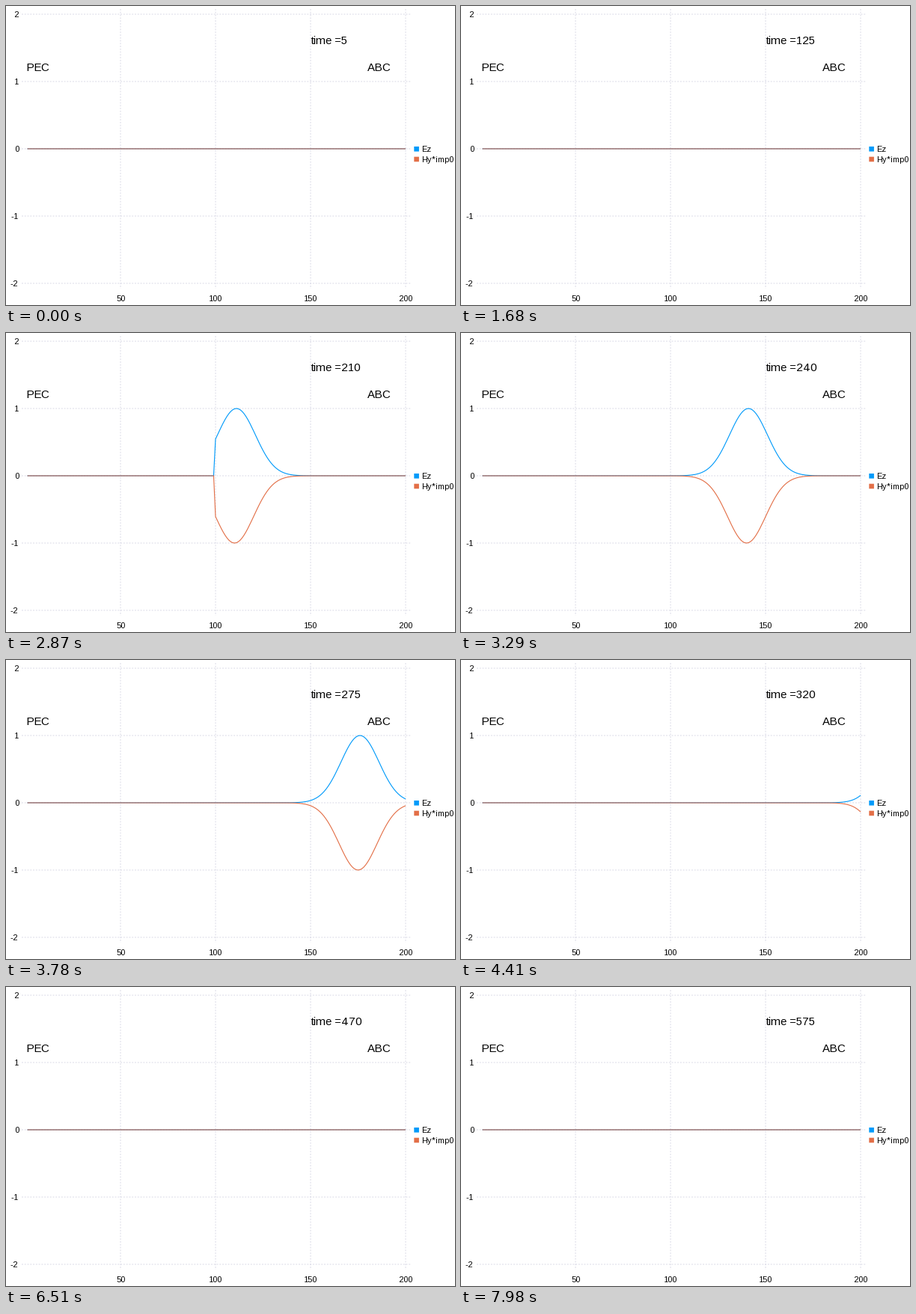
These frames come from a looping animation (600 by 400 pixels, 8 s). A matplotlib script:

```python
import numpy as np
import matplotlib.pyplot as plt
from matplotlib.animation import FuncAnimation
from matplotlib.patches import Rectangle

W, H, DPI = 600, 400, 100
PX = 72 / DPI                       # points per pixel
TICK, INTERVAL, LOOP = 70, 20, 8000
SOURCE, SIGMA, DELAY = 100, 10, 200
BLUE, ORANGE = "#009afa", "#e36f47"

# a hinting factor of 1 rounds glyph advances to whole pixels
plt.rcParams.update({"font.family": "Liberation Sans",
                     "text.hinting": "force_autohint",
                     "text.hinting_factor": 1})

fig = plt.figure(figsize=(W / DPI, H / DPI), dpi=DPI, facecolor="white")
ax = fig.add_axes([0, 0, 1, 1])
ax.set(xlim=(0, W), ylim=(H, 0))
ax.axis("off")


def sx(cell):
    return 26 + 2.54 * cell


def sy(value):
    return 191 - 90 * value


def label(x, y, text, size=10.67, ha="left"):
    return ax.text(x, y, text, fontsize=size * PX, ha=ha, va="baseline",
                   color="black", zorder=5)


def grid_line(xs, ys):
    ax.plot(xs, ys, color="#d0d0e0", lw=0.8 * PX, zorder=1, snap=False,
            dashes=(2.36, 2.36), dash_capstyle="butt")


def curve(color, z):
    line, = ax.plot([], [], color=color, lw=1.13 * PX, zorder=z, snap=False,
                    solid_capstyle="butt", solid_joinstyle="miter")
    return line


for v in range(-2, 3):
    grid_line([21, 541], [sy(v)] * 2)
    label(17, sy(v) + 4, str(v), ha="right")
for c in range(50, 201, 50):
    grid_line([sx(c)] * 2, [4, 378])
    label(sx(c), 395, str(c), ha="center")

for y, name, color in ((191.3, "Ez", BLUE), (205, "Hy*imp0", ORANGE)):
    ax.add_patch(Rectangle((545.3, y - 3.3), 6.6, 6.6, color=color, lw=0,
                           snap=False))
    label(555, y + 4, name)

label(sx(0), 87, "PEC", 14.67)
label(sx(180), 87, "ABC", 14.67)
clock = label(sx(150), 51, "", 14.67)

cells = np.arange(1, 201)
e_line = curve(BLUE, 2)
h_line = curve(ORANGE, 3)


def pulse(center):
    """Gaussian wave that exists only from the source cell onwards."""
    wave = np.exp(-(cells - center) ** 2 / (2 * SIGMA ** 2))
    return np.where(cells >= SOURCE, wave, 0)


def update(k):
    step = (k * INTERVAL + INTERVAL // 2) // TICK
    t = 5 * (step + 1)
    peak = SOURCE + t - DELAY
    e_line.set_data(sx(cells), sy(pulse(peak + 1)))
    h_line.set_data(sx(cells), sy(-pulse(peak)))
    clock.set_text(f"time ={t}")
    return e_line, h_line, clock


anim = FuncAnimation(fig, update, frames=LOOP // INTERVAL, interval=INTERVAL,
                     repeat=True, repeat_delay=0)
plt.show()
```
